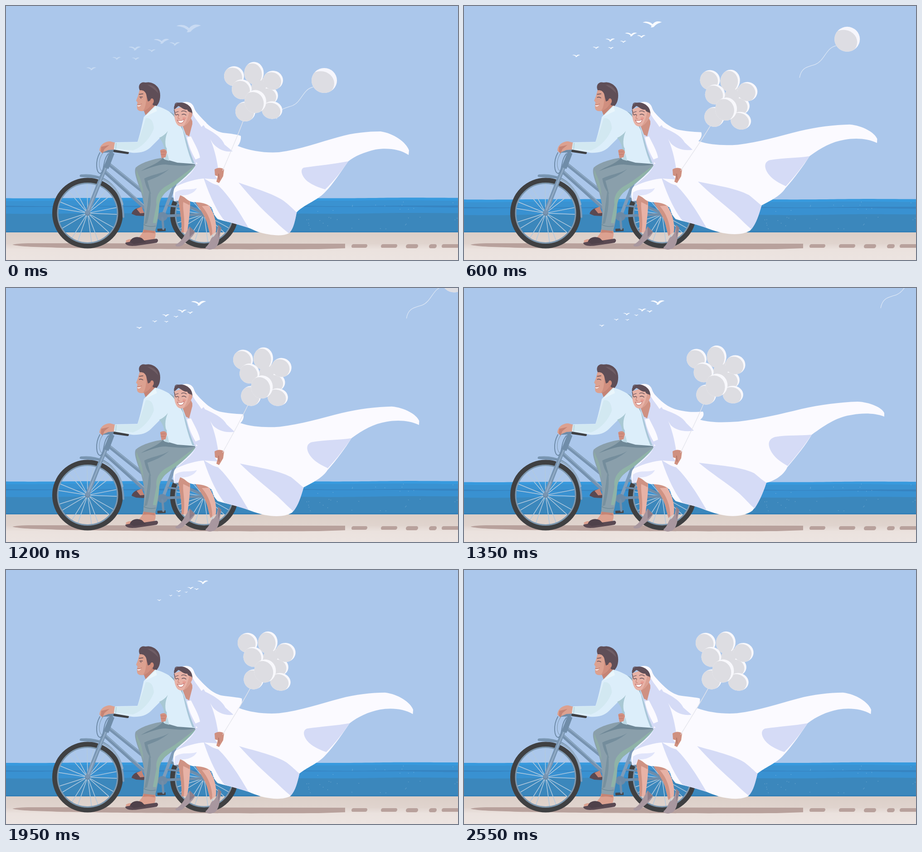
Animation, 997 px wide and 561 px high, one loop 2700 ms. Source, as an HTML page with a canvas:

```html
<!DOCTYPE html>
<html lang="en">
<head>
<meta charset="utf-8">
<title>Seaside ride</title>
<style>
html,body{margin:0;width:100%;height:100%;overflow:hidden;background:#abc7eb}
canvas{display:block;width:997px;height:561px}
</style>
</head>
<body>
<canvas id="stage" width="997" height="561"></canvas>
<script>
const ctx = document.getElementById('stage').getContext('2d');
const W = 997, H = 561, STEP = 150, STEPS = 18, TAU = Math.PI * 2;
const WHITE = '#fbfaff', LILAC = '#d5dbf6', SKIN = '#dca190', TAN = '#c58475', ROSE = '#e7b2a6';
const HAIR = '#5f4e57', STEEL = '#7f9cb9', DARK = '#3f4042', SOLE = '#5a4952';

function fill(color, d) {
  ctx.fillStyle = color;
  ctx.fill(new Path2D(d));
}
function line(color, width, d, cap = 'round') {
  ctx.strokeStyle = color;
  ctx.lineWidth = width;
  ctx.lineCap = cap;
  ctx.lineJoin = 'round';
  ctx.stroke(new Path2D(d));
}
function oval(color, x, y, rx, ry = rx) {
  ctx.fillStyle = color;
  ctx.beginPath();
  ctx.ellipse(x, y, rx, ry, 0, 0, TAU);
  ctx.fill();
}
function ring(color, width, x, y, r) {
  ctx.strokeStyle = color;
  ctx.lineWidth = width;
  ctx.beginPath();
  ctx.arc(x, y, r, 0, TAU);
  ctx.stroke();
}
// Blend two paths that share the same commands.
function blend(a, b, k) {
  const ends = b.match(/\d+/g);
  let i = 0;
  return a.replace(/\d+/g, v => (+v + (ends[i++] - v) * k).toFixed(2));
}
// Bounce 0..half..0
function bounce(n, half) {
  const m = n % (half * 2);
  return m > half ? half * 2 - m : m;
}
function random(seed) {
  return () => (seed = (seed * 16807) % 2147483647) / 2147483647;
}

const FLOCK = [[403, 48, 54], [343, 77, 34], [372, 83, 24], [284, 93, 27],
  [321, 98, 18], [244, 115, 19], [286, 116, 17], [188, 138, 22]];
const GULL = 'M-28 -4C-18 -9 -6 -6 1 1C8 -8 18 -9 28 -5C18 -2 12 1 7 6C5 10 0 11 -5 10C-1 8 -2 4 -6 3C-12 -2 -20 -3 -28 -4Z';

function birds(n) {
  const s = Math.pow(0.94, n);
  const alpha = Math.min(1, 0.36 + n * 0.17, (17 - n) * 0.27);
  if (alpha <= 0) return;
  ctx.globalAlpha = alpha;
  for (const [x, y, w] of FLOCK) {
    ctx.save();
    ctx.translate(459 + (x - 459) * s, 9 + (y - 9) * s);
    ctx.scale(w * s / 56, w * s / 56);
    fill('#f8fbff', GULL);
    ctx.restore();
  }
  ctx.globalAlpha = 1;
}

function band(color, y, amp, phase) {
  ctx.fillStyle = color;
  ctx.beginPath();
  ctx.moveTo(0, 501);
  for (let x = 0; x <= W + 8; x += 8)
    ctx.lineTo(x, y + amp * Math.sin(x / 95 + phase) + amp * 0.4 * Math.sin(x / 37));
  ctx.lineTo(W, 501);
  ctx.fill();
}

function sea(n) {
  const dy = bounce(n, 3) * 1.4;
  band('#379ade', 424 + dy, 0.6, 1);
  band('#3a92d1', 430 + dy, 0.7, 2);
  band('#3684c1', 441 + dy, 0.9, 0);
  band('#3991d1', 444 + dy, 0.8, 3);
  band('#3b87bc', 458 + dy, 0.9, 1);
  band('#3280b8', 497, 0.3, 0);
  const rnd = random(77);
  ctx.fillStyle = 'rgba(225,240,250,.55)';
  for (let i = 0; i < 34; i++)
    ctx.fillRect(660 + rnd() * 335, 432 + rnd() * 60, 1, 1);
}

function sand() {
  const g = ctx.createLinearGradient(0, 500, 0, H);
  g.addColorStop(0, '#dccfc8');
  g.addColorStop(0.4, '#e0d4ce');
  g.addColorStop(0.62, '#ebe2de');
  g.addColorStop(1, '#ece4e1');
  ctx.fillStyle = g;
  ctx.fillRect(0, 500, W, H - 500);
  const shade = '#b8a19c';
  fill(shade, 'M14 527C30 523 60 524 110 524L748 525V535L690 537C500 538 260 537 120 534C70 532 30 532 14 527Z');
  for (const [x, w] of [[762, 35], [827, 36], [882, 27], [933, 17], [961, 50]]) {
    ctx.fillStyle = shade;
    ctx.beginPath();
    ctx.roundRect(x, 526, w, w < 30 ? 9 : 8, [7, 5, 7, 5]);
    ctx.fill();
  }
}

function balloon(x, y, rx, ry, cut) {
  ctx.save();
  oval('#f8f8fc', x, y, rx, ry);
  ctx.clip();
  oval('#dddde2', x - cut, y + cut * 0.8, rx, ry);
  ctx.restore();
}

function strayBalloon(n) {
  if (n > 10) return;
  ctx.save();
  ctx.translate(35.8 * n, -22.8 * n);
  line('#dce6f4', 1.3, 'M677 179C655 184 652 212 632 220C615 226 601 226 597 249');
  oval('#f6f6fc', 702, 164.5, 28, 27.5);
  ctx.clip();
  oval('#dddde3', 694, 171, 30, 27);
  ctx.restore();
}

function bunch(n) {
  ctx.save();
  ctx.translate(478, 365);
  ctx.rotate(bounce(n, 5) * 2.75 * Math.PI / 180);
  ctx.translate(-478, -365);
  line('#e4e5ec', 1.3, 'M523 254C510 290 492 330 478 363');
  oval('#dddde2', 561, 178, 19, 20);
  balloon(580, 198, 20, 19, 4);
  balloon(503, 155, 22, 22, 4);
  balloon(589, 164, 22, 21, 4);
  balloon(547, 148, 21.5, 24.5, 4);
  oval('#dddde2', 557, 180, 16, 16);
  balloon(520, 184, 22, 22, 4);
  balloon(528, 233, 22, 22, 3);
  balloon(587, 230, 22.5, 19.5, 4);
  balloon(550, 211, 24, 25.5, 5.5);
  ctx.restore();
}

function wheel(x, y, r) {
  ctx.strokeStyle = '#b3cade';
  ctx.lineWidth = 1.5;
  for (let i = 0; i < 18; i++) {
    const a = i * TAU / 18 + (i % 2 ? 0.16 : 0.04), far = r - 12;
    ctx.beginPath();
    ctx.moveTo(x + 6 * Math.cos(a), y + 6 * Math.sin(a));
    ctx.lineTo(x + far * Math.cos(a), y + far * Math.sin(a));
    ctx.stroke();
  }
  ring('#7d98b0', 4, x, y, r - 11.5);
  ring(DARK, 10.5, x, y, r - 5.25);
  oval('#6d8aa5', x, y, 6);
}

function bike() {
  wheel(437, 460, 75);
  line('#6f8daa', 6, 'M437 460L345 464M437 458L362 424');
  line(STEEL, 7, 'M372 395L344 468');
  line('#6f8daa', 4, 'M358 441L410 447');
  oval('#6d8aa6', 345, 465, 11, 10);
  line('#46474c', 6, 'M334 495L352 494', 'butt');
  line('#728ea9', 5, 'M345 468L347 492');
  // crossbars
  line('#7793b0', 8, 'M229 351L322 426');
  line('#8faac4', 2, 'M231 350L322 423');
  line('#7591ae', 8, 'M218 366L318 456');
  line('#8eaac4', 2, 'M220 365L318 452');
  wheel(180, 457.5, 78);
  line('#7d9ab6', 4, 'M166 374C183 372 200 375 216 382C240 395 258 422 259 466');
  line('#94adc6', 4, 'M213 383C235 392 251 412 257 438');
  line('#7794b1', 5, 'M165 375L208 379');
  line('#7895b2', 9, 'M232 326L209 382L180 456');
  line('#91abc6', 3, 'M232 330L208 386L182 450');
  line('#708da9', 11, 'M234 324L221 358', 'butt');
  line('#6e8ba8', 2, 'M207 324C196 344 199 368 208 370C218 366 212 342 226 326');
  line('#8aa5bf', 1.5, 'M214 324C202 340 205 359 211 364');
  line('#6e8ba7', 6, 'M214 321L240 320');
  line('#3e4044', 6, 'M240 320L268 324');
}

function man(open) {
  // far foot
  fill(SOLE, 'M277 459C279 450 288 446 296 445L306 458L304 464L287 463Z');
  fill(TAN, 'M288 448L299 443L305 457L296 458Z');
  // near foot
  fill(SKIN, 'M303 492L329 494C331 503 330 510 327 516L290 520C285 514 302 508 303 492Z');
  fill(TAN, 'M304 493L329 495L328 502C318 500 309 500 302 501Z');
  fill(SKIN, 'M264 519C268 515 274 514 279 516L280 523L265 522Z');
  fill(SOLE, 'M263 523C271 520 280 521 290 520L331 514C336 514 337 520 332 523L291 529C276 531 264 530 263 523Z');
  fill('#4f414a', 'M273 521C276 511 289 507 300 513L309 522L282 526Z');
  // trousers
  fill('#8a9fab', 'M347 335C322 338 297 347 286 357C282 365 287 380 293 397C299 412 302 426 304 438C307 460 303 478 303 494L329 497C334 480 337 460 338 440C340 424 347 415 359 406C380 390 405 369 419 350L382 341Z');
  fill('#8fb3a7', 'M419 351C400 364 376 386 353 398C335 409 330 424 332 438L324 479L331 480C336 465 337 451 338 437C341 423 347 414 360 405C382 390 407 368 419 351Z');
  fill('#8eaba6', 'M288 362C285 370 290 382 295 398L303 420C303 405 299 385 292 373Z');
  fill('#6f8897', 'M347 335L419 350C397 355 372 352 352 350C334 350 316 358 297 365C315 353 333 350 347 335Z');
  fill('#748d9c', 'M305 381C322 372 343 371 360 360C344 374 326 381 312 386L320 416C312 406 307 394 305 381Z');
  fill('#78919f', 'M317 403C322 425 318 455 311 480L305 482C311 455 313 428 317 403Z');
  line('#718b98', 1.5, 'M304 483C312 487 321 488 330 486');
  // neck and face
  fill(TAN, 'M302 226L324 205L333 222L309 244Z');
  fill(SKIN, 'M295 184L291 199L287 209L290 213L289 218L289 224C289 230 294 233 302 232C312 229 321 221 323 209L321 185Z');
  fill('#d08f7f', 'M311 190C308 206 311 221 302 232C313 229 323 219 324 207L321 187Z');
  fill(HAIR, 'M295 186C290 175 297 166 308 169C321 166 336 175 339 188C342 201 339 214 332 221L324 219L322 207L313 211L309 194C304 184 299 187 295 186Z');
  fill('#6f5d65', 'M312 174C324 173 334 182 336 193C329 185 321 180 312 174Z');
  oval('#d08c7a', 322, 210, 4, 6);
  line(HAIR, 1.7, 'M294 195L302 194');
  line(HAIR, 1.4, open ? 'M295 201L301 201M297 203L298 204' : 'M294 202Q298 200 302 203');
  fill('#fff1ee', 'M290 219C293 220 296 219 298 217C297 221 293 223 290 221Z');
  line('#b5675f', 1, 'M290 218C294 219 297 218 299 216');
  // hands
  fill(SKIN, 'M206 319C207 307 217 299 230 299L241 302L240 317L226 318L214 323L208 322Z');
  fill(TAN, 'M210 311L228 307L217 316L213 326L209 322Z');
  // shirt
  fill('#dceefa', 'M304 245L329 220C352 226 375 239 386 260C397 280 403 309 408 331L419 349L378 346L347 337L355 315L340 291L319 312C309 322 294 325 278 324L238 317L241 301L290 300C295 286 299 267 304 245Z');
  fill('#d2e8f1', 'M308 248C320 245 326 257 326 271C319 290 302 311 280 319L238 314L240 302L290 301C296 287 303 266 308 248Z');
  fill('#eaf6fc', 'M306 245L330 222L333 232L318 239Z');
  fill('#a8c8d3', 'M338 291C345 288 352 283 357 276C350 292 350 306 355 319L349 336L346 333C353 315 347 302 338 291Z');
  fill('#bcd8e4', 'M349 339L356 325L360 342Z');
  fill('#93b3c8', 'M360 233C371 237 381 246 387 261L391 276C383 261 374 245 360 233Z');
  fill('#a9c7d9', 'M389 268C398 290 406 325 419 348L411 347C402 325 395 300 389 268Z');
  line('#b8d6e0', 2, 'M243 303L242 316');
  // embracing hand
  fill('#d28f80', 'M340 319C346 314 354 316 355 323L352 334L343 336Z');
  line('#bb7668', 1, 'M342 322L351 322M342 328L351 328');
}

const TRAIN = [
  'M414 228C434 250 453 275 478 280C497 282 512 284 518 287C519 296 515 305 511 309C540 321 575 325 602 323C650 317 690 301 735 289C765 280 800 277 826 277C855 281 883 301 889 319L888 329C868 315 838 313 815 317C790 323 770 331 755 343C740 364 722 393 703 412C686 430 655 440 641 456C638 472 633 494 624 502C608 510 580 506 556 499C540 492 525 485 510 481C495 478 480 475 466 470L436 380Z',
  'M414 228C434 250 448 264 475 270C497 275 512 274 527 273C531 280 526 287 521 291C545 298 575 297 605 295C650 290 700 278 745 267C785 258 830 252 868 251C895 252 922 264 927 276L927 284C905 276 880 276 857 280C825 284 800 300 767 324C755 345 735 370 713 396C705 415 680 428 667 430C659 455 650 475 636 492C620 503 600 505 580 503C555 500 530 489 510 482C495 478 480 475 466 470L436 380Z'];
const SIDE_FOLD = [
  'M755 343C724 349 692 352 657 357C647 361 653 378 666 388C677 396 690 401 704 405C724 386 741 363 755 343Z',
  'M767 324C740 327 712 324 686 329C667 335 671 351 680 365C688 377 700 385 714 393C734 370 752 346 767 324Z'];
const LOW_FOLD = [
  'M513 390C546 402 589 414 612 430C623 438 634 449 641 456C638 474 634 494 624 502C613 494 598 480 588 470C564 449 539 421 513 390Z',
  'M518 386C562 392 609 394 640 409C651 418 660 426 667 430C659 452 653 469 641 487C630 478 617 462 604 451C577 429 545 409 518 386Z'];
const VEIL_FOLD = [
  'M426 262C450 274 475 288 482 306L500 321C481 324 465 314 456 303C449 291 438 274 426 262Z',
  'M426 262C450 273 478 279 490 298L507 315C485 319 466 313 456 303C449 291 438 274 426 262Z'];

function legs() {
  fill(ROSE, 'M380 416C379 439 389 462 387 500L400 500C403 475 407 451 406 428Z');
  fill('#cf9384', 'M380 416C379 439 389 462 387 500L392 500C396 470 389 448 391 433L405 440L406 428Z');
  fill(ROSE, 'M416 430C426 447 442 465 446 489L451 508L463 499C465 482 461 463 451 446L443 430Z');
  fill('#cf9384', 'M416 430C426 447 442 465 446 489L451 508L455 504C455 480 446 458 432 442L447 441L443 430Z');
  fill('#a8979f', 'M405 487L417 499C412 512 398 519 390 528C383 533 372 532 374 527C388 521 394 505 405 487Z');
  fill('#8f7f8a', 'M405 487L417 499L405 510Z');
  fill('#a8979f', 'M468 483L475 490C471 506 472 523 463 533C456 540 441 539 440 533C452 524 450 511 457 510C464 505 466 495 468 483Z');
  fill('#8f7f8a', 'M468 483L475 490L468 512Z');
}

function train(n) {
  const k = Math.pow(bounce(n, 3) / 3, 1.3);
  const morph = (color, pair) => fill(color, blend(pair[0], pair[1], k));
  morph(WHITE, TRAIN);
  morph(LILAC, SIDE_FOLD);
  morph(LILAC, LOW_FOLD);
  morph(LILAC, VEIL_FOLD);
}

function bride() {
  // gown
  fill(LILAC, 'M411 232C427 249 441 267 447 286C458 309 465 337 468 361L465 370L452 386L437 390L418 352C410 335 401 310 397 287Z');
  fill(WHITE, 'M419 350C413 367 386 383 374 399C367 406 369 423 371 431L380 430L384 418C396 421 398 430 411 433C429 433 445 436 454 446C458 459 461 466 468 471L510 482L535 489C517 453 494 419 474 389L441 363L419 345Z');
  fill(LILAC, 'M419 349C416 365 398 378 374 399C399 387 421 382 437 381L467 383L441 344Z');
  fill(LILAC, 'M436 380C448 388 458 394 468 396C493 420 516 457 535 490L482 474C463 451 446 411 436 380Z');
  fill('#e0e4fa', 'M373 412C387 401 406 408 421 402C416 414 397 420 384 418L378 430L371 430Z');
  fill(WHITE, 'M399 290L408 288C416 304 426 321 428 335L418 339C410 325 403 310 399 290Z');
  // neck and face
  fill('#cf9182', 'M390 266L408 248L412 257L404 288L397 284Z');
  fill(ROSE, 'M371 228C371 242 371 252 377 261C383 269 393 267 401 258C408 250 413 241 411 231L399 219Z');
  fill('#dba092', 'M405 232L411 235C411 247 401 261 391 266C401 252 402 242 405 232Z');
  fill(HAIR, 'M371 229C368 216 379 211 394 214C407 216 414 229 411 240C406 231 402 236 400 229C391 230 386 222 380 221Z');
  line(HAIR, 1.4, 'M373 220C371 214 379 212 384 216M371 230C373 236 372 238 374 240');
  oval('#dc9f91', 408, 240, 3, 5);
  line(HAIR, 1.3, 'M374 235L380 233M387 233Q392 230 398 234');
  line(HAIR, 1.4, 'M375 241Q378 238 381 241M388 240Q393 237 397 241');
  oval('#e79c92', 393, 248, 4, 2.5);
  line('#bd7668', 1, 'M381 241L379 248L383 249');
  fill('#fffaf8', 'M378 252C383 254 388 253 393 250C392 257 387 260 382 258Z');
  line('#ba5b57', 1, 'M378 252C384 254 389 253 393 250C392 258 387 260 382 258Z');
  // veil cap
  fill(WHITE, 'M389 213C402 209 412 214 415 225C418 235 430 247 442 258L430 268L421 260C416 252 412 243 411 235C410 223 401 216 389 213Z');
  fill(LILAC, 'M411 235C415 249 427 257 434 273L421 268L411 260Z');
  // hand
  fill('#cf9080', 'M460 361C466 357 474 356 481 361L479 376L470 391L464 388L467 376L461 374Z');
  line('#a56a5f', 1.3, 'M469 371L470 383');
}

function draw(now) {
  const n = Math.floor(now / STEP) % STEPS;
  ctx.fillStyle = '#abc7eb';
  ctx.fillRect(0, 0, W, H);
  birds(n);
  sea(n);
  sand();
  strayBalloon(n);
  bike();
  legs();
  train(n);
  man(n < 3 || (n > 9 && n < 14));
  bride();
  bunch(n);
}

const start = performance.now();
function tick() {
  draw(performance.now() - start);
  requestAnimationFrame(tick);
}
tick();
</script>
</body>
</html>
```
